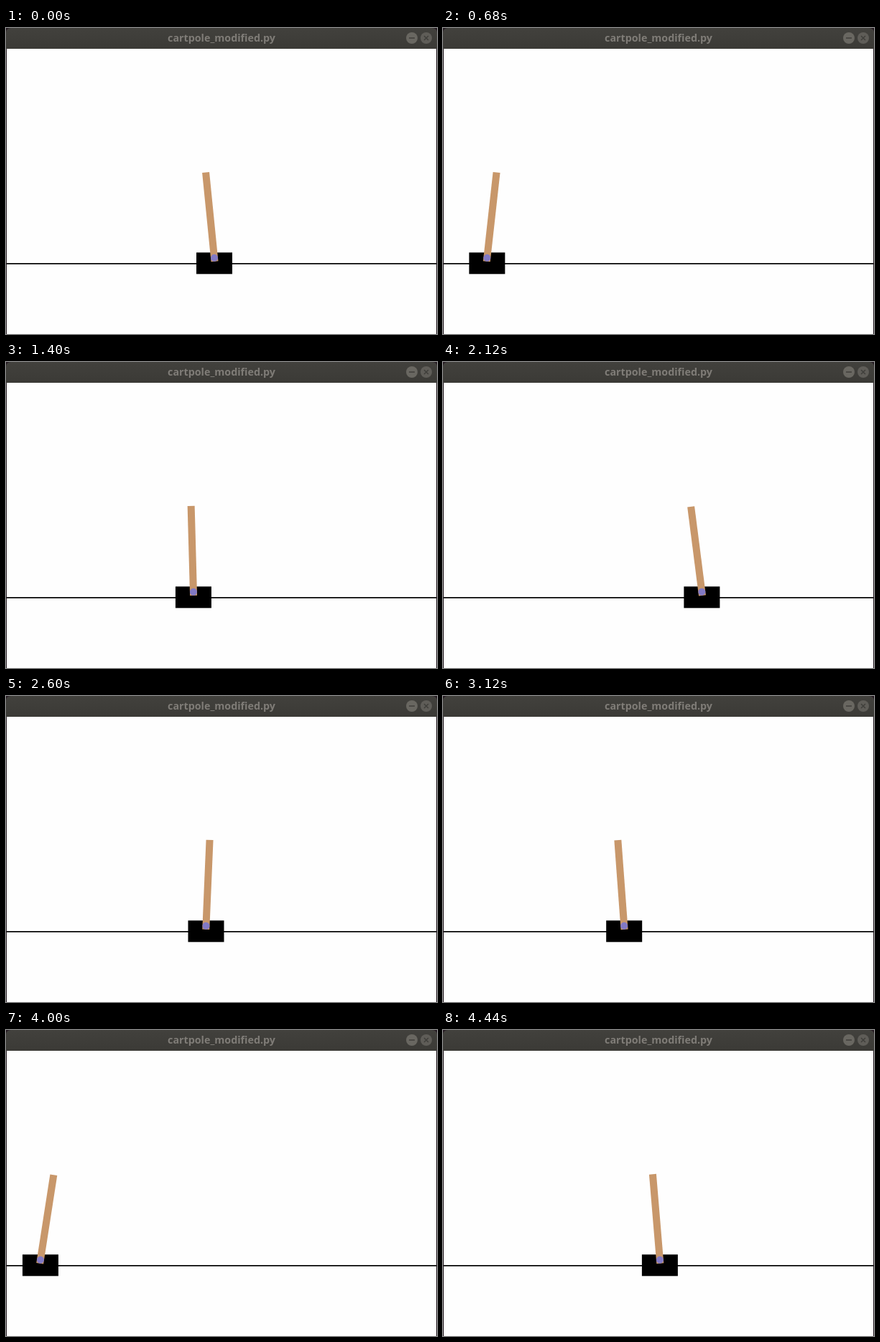
Animation, 600 px wide and 427 px high, one loop 4480 ms. Source, as an HTML page:

```html
<!DOCTYPE html>
<html lang="en">
<head>
<meta charset="utf-8">
<title>Cart and pole</title>
<style>
  html, body { margin: 0; width: 100%; height: 100%; overflow: hidden; background: #251a22; }
  svg { display: block; width: 600px; height: 427px; }
  text { font: 700 14.3px "Open Sans", "Noto Sans", sans-serif; fill: #7f7c77; }
</style>
</head>
<body>
<svg viewBox="0 0 600 427">
  <defs>
    <linearGradient id="bar" x2="0" y2="1">
      <stop offset="0" stop-color="#42413d"/>
      <stop offset="1" stop-color="#3b3a36"/>
    </linearGradient>
    <clipPath id="view"><rect x="1" y="29" width="598" height="398"/></clipPath>
  </defs>
  <path d="M0 29V7Q0 0 7 0H593Q600 0 600 7V29Z" fill="url(#bar)"/>
  <text x="300" y="19" text-anchor="middle">cartpole_modified.py</text>
  <g stroke="#403f3b" stroke-width="1.5">
    <circle cx="565" cy="14" r="8" fill="#696761" stroke="none"/>
    <circle cx="585" cy="14" r="8" fill="#5f5d58" stroke="none"/>
    <path d="M561 14h8M582 11l6 6M588 11l-6 6"/>
  </g>
  <g clip-path="url(#view)">
    <rect y="29" width="600" height="398" fill="#fefefe"/>
    <rect y="328" width="600" height="1.7"/>
    <g id="cart">
      <rect x="-25" y="313.3" width="50" height="30"/>
      <g id="pole">
        <rect x="-5" y="-120" width="10" height="125" fill="#c8976a"/>
        <circle r="5" fill="#8279c4"/>
      </g>
    </g>
  </g>
</svg>
<script>
const LOOP = 4480, STEP = 40;

// Turning points of each swing: [time in ms, value].
const cartTurns = [
  [60, 290], [810, 43.5], [1872, 414], [2475, 266], [2820, 309], [3842, 22], [4841, 451]
];
const tiltTurns = [
  [100, -5.7], [780, 7], [1990, -9.5], [2490, 4.5], [2880, -6.8], [3830, 10.5], [4750, -10]
];

// Half a cosine wave leads from each turning point to the next.
function swing(turns, t) {
  const next = Math.max(1, turns.findIndex(([time]) => time > t));
  const [t0, v0] = turns[next - 1], [t1, v1] = turns[next];
  const u = Math.max(0, (t - t0) / (t1 - t0));
  return v0 + (v1 - v0) * (1 - Math.cos(Math.PI * u)) / 2;
}

const cart = document.getElementById("cart");
const pole = document.getElementById("pole");

function draw(time) {
  const t = Math.floor((time % LOOP) / STEP) * STEP;
  cart.setAttribute("transform", `translate(${swing(cartTurns, t).toFixed(2)} 0)`);
  pole.setAttribute("transform", `translate(0 320.8) rotate(${swing(tiltTurns, t).toFixed(2)})`);
}

const start = performance.now();
function tick() {
  draw(performance.now() - start);
  requestAnimationFrame(tick);
}
tick();
</script>
</body>
</html>
```
